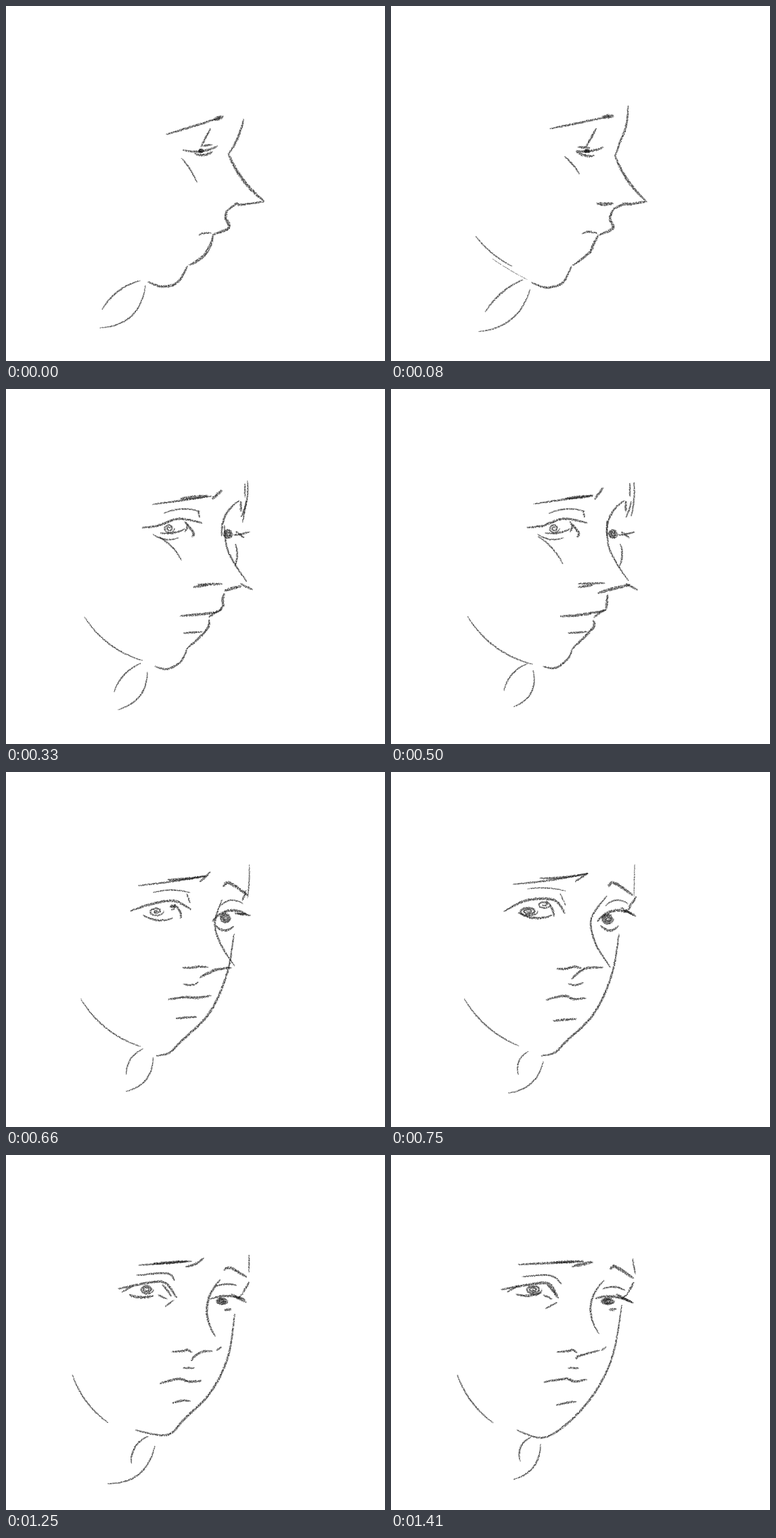
An HTML page with a canvas that plays this animation: 560 px wide and 525 px high, repeating every 1660 ms.

```html
<!DOCTYPE html>
<html lang="en">
<head>
<meta charset="utf-8">
<title>Turning head</title>
<style>
  html, body { margin: 0; width: 100%; height: 100%; overflow: hidden; background: #fff; }
  canvas { display: block; width: 560px; height: 525px; }
</style>
</head>
<body>
<canvas id="stage" width="560" height="525"></canvas>
<script>
const W = 560, H = 525, TAU = Math.PI * 2;
const lerp = (a, b, t) => a + (b - a) * t;

// A stroke is a weight in pixels and a path: u in 0..1 gives [x, y].

// Bowed line; bow is how far its middle leans to the right of travel
function arc(weight, x0, y0, x1, y1, bow = 0) {
  const len = Math.hypot(x1 - x0, y1 - y0);
  const path = u => {
    const k = 4 * u * (1 - u) * bow / len;
    return [lerp(x0, x1, u) - (y1 - y0) * k, lerp(y0, y1, u) + (x1 - x0) * k];
  };
  return { weight, path };
}

// Catmull-Rom line through a few points
function curve(weight, ...xy) {
  const n = xy.length / 2 - 1;
  const at = (i, k) => xy[2 * Math.max(0, Math.min(n, i)) + k];
  const path = u => {
    const i = Math.min(n - 1, Math.floor(u * n)), t = u * n - i;
    return [0, 1].map(k => {
      const [a, b, c, d] = [-1, 0, 1, 2].map(j => at(i + j, k));
      return b + t / 2 * (c - a + t * (2 * a - 5 * b + 4 * c - d + t * (3 * (b - c) + d - a)));
    });
  };
  return { weight, path };
}

// Spiral scribble that fills an ellipse
function iris(weight, x, y, rx, ry, turns = 3) {
  const path = u => {
    const a = u * turns * TAU, r = 1 - 0.85 * u;
    return [x + Math.cos(a) * rx * r, y + Math.sin(a) * ry * r];
  };
  return { weight, path };
}

const profile = {
  brow: arc(3.5, 237, 190, 318, 165),
  browEnd: arc(7, 308, 168, 320, 164),
  ridge: arc(3.5, 351, 167, 329, 219, -3),
  bridge: arc(4.8, 329, 219, 381, 288, 6),
  noseBase: curve(3.8, 382, 289, 346, 294, 341, 292, 326, 303),
  lip: curve(4.8, 326, 303, 325, 314, 329, 328, 306, 338),
  mouth: arc(3, 285, 339, 303, 336, -2),
  lowLip: arc(4.8, 306, 339, 271, 383, -8),
  chin: curve(4, 268, 385, 253, 409, 230, 415, 210, 408),
  neck: arc(2.5, 198, 406, 142, 449, 7),
  throat: arc(2.3, 206, 413, 139, 476, -19),
  lash: arc(3, 302, 181, 288, 208),
  lid: arc(3.5, 261, 213, 313, 207, 5),
  lidLow: arc(4, 279, 218, 305, 215, 4),
  lidTop: arc(3.5, 290, 207, 304, 205),
  pupil: iris(2.5, 288, 214, 4, 3),
  cheek: arc(2.3, 259, 225, 282, 261, -2)
};

const lowered = {
  brow: arc(3.2, 233, 173, 322, 163),
  browEnd: arc(7, 317, 161, 337, 160),
  ridge: curve(3, 350, 128, 349, 168, 336, 205, 333, 224),
  bridge: arc(3.5, 333, 224, 371, 287, 4),
  noseBase: arc(5, 374, 289, 331, 297),
  nostril: arc(5.5, 304, 292, 328, 292, 1),
  lip: curve(4, 331, 297, 322, 315, 327, 329, 309, 339),
  mouth: arc(3.5, 280, 334, 306, 337, -3),
  lowLip: curve(3.5, 306, 338, 298, 347, 299, 356, 266, 384),
  chin: curve(3.3, 266, 384, 254, 410, 241, 415, 228, 418, 205, 410),
  jaw: arc(2, 125, 340, 179, 385, 4),
  jawFaint: arc(0.7, 150, 374, 202, 405, 1),
  neck: arc(2.8, 191, 404, 137, 455, 4),
  throat: arc(2.3, 205, 425, 120, 487, -14),
  lash: arc(4, 304, 181, 288, 208, -1),
  lid: arc(4, 288, 215, 314, 211, 1),
  lidLow: arc(4, 268, 212, 295, 228, 2),
  lidTop: arc(4, 263, 210, 284, 215),
  pupil: iris(2.5, 291, 215, 6, 2),
  cheek: arc(3, 254, 220, 275, 236, -1)
};

const opening = {
  brow: arc(3, 211, 170, 298, 157),
  browDark: arc(5, 258, 162, 298, 158),
  browEnd: arc(4, 301, 163, 313, 146),
  ridge: arc(2.3, 359, 138, 355, 188, -2),
  ridgeIn: arc(2.3, 353, 139, 353, 160),
  ridgeLow: arc(2.5, 355, 166, 347, 190, -1),
  socket: arc(3.2, 319, 218, 345, 165, -9),
  socketEdge: arc(3.5, 347, 166, 347, 181),
  bridge: curve(2.6, 319, 195, 321, 230, 333, 257, 351, 284),
  farIris: iris(3, 328, 214, 7, 7),
  farLash: arc(3, 336, 216, 360, 211, 1),
  farLashLow: arc(3, 340, 211, 352, 220),
  farCheek: arc(2.8, 339, 229, 338, 262, -3),
  nostril: arc(3.3, 277, 288, 316, 287),
  nostrilLow: arc(3.8, 277, 293, 298, 290),
  noseBase: arc(5, 306, 302, 353, 290, -1),
  noseTip: arc(3.3, 347, 288, 364, 297),
  lip: arc(4.3, 320, 304, 318, 325),
  lipEdge: arc(3.5, 318, 326, 300, 338, 1),
  mouth: arc(4.3, 250, 336, 317, 327, 2),
  lowLip: curve(4, 299, 342, 298, 354, 268, 384),
  underLip: arc(3.2, 262, 361, 290, 359),
  chin: curve(3.3, 268, 384, 262, 398, 248, 410, 237, 413, 225, 410),
  jaw: arc(2.2, 113, 336, 209, 407, 12),
  neck: arc(2.3, 202, 406, 167, 446, 7),
  throat: arc(2.3, 210, 416, 181, 470, -13),
  crease: arc(2.3, 233, 184, 286, 181, -5),
  creaseEnd: arc(2.5, 284, 180, 286, 190),
  eyeLid: curve(3.8, 201, 205, 225, 202, 255, 192, 290, 198),
  iris: iris(2.6, 241, 206, 8, 7, 2),
  eyeEdge: arc(3.3, 264, 196, 264, 211, -4),
  eyeMid: arc(3, 228, 213, 264, 207, 3),
  eyeLow: arc(2.3, 217, 215, 255, 220, 5),
  eyeInner: curve(4, 268, 200, 277, 213, 275, 219),
  cheek: arc(2.3, 217, 218, 254, 259, -4)
};

const facing = {
  brow: arc(2.8, 180, 166, 291, 150, 2),
  browDark: arc(3.5, 220, 157, 291, 150, 2),
  browEnd: arc(3, 272, 162, 291, 150),
  ridge: arc(1.3, 360, 136, 359, 184),
  farBrow: curve(4.8, 321, 169, 330, 164, 357, 182),
  socketEdge: arc(3.3, 362, 184, 351, 199, -1),
  farCrease: arc(2.3, 317, 198, 350, 195, -7),
  bridge: curve(3, 319, 183, 296, 217, 302, 253, 324, 289),
  farLid: arc(4.3, 305, 221, 357, 211, -11),
  farLash: arc(3.8, 340, 201, 362, 213),
  farLashLow: arc(3, 344, 208, 355, 199),
  farIris: iris(3.4, 320, 217, 9, 8),
  farLow: arc(3.8, 310, 227, 336, 228, 7),
  contour: curve(3.5, 337, 240, 326, 300, 300, 357, 257, 400, 242, 415, 222, 420),
  nostril: curve(4, 245, 291, 258, 291, 270, 288, 281, 290),
  noseBase: curve(4, 267, 306, 277, 297, 290, 290, 313, 289),
  noseLow: arc(3, 262, 313, 284, 311, 3),
  mouth: curve(4, 229, 337, 256, 331, 270, 336, 288, 334),
  underLip: arc(3.8, 239, 368, 274, 365),
  jaw: arc(2.2, 108, 335, 189, 405, 9),
  neck: arc(2.2, 203, 413, 188, 448, 7),
  throat: arc(2.2, 225, 428, 173, 475, -12),
  crease: arc(1.8, 202, 173, 258, 176, -3),
  creaseEnd: arc(1.8, 250, 180, 258, 197),
  eyeLid: curve(4, 167, 206, 200, 190, 240, 189, 257, 209),
  iris: iris(3.2, 203, 206, 14, 7, 2.5),
  eyeEdge: iris(2.8, 226, 196, 10, 6, 1.5),
  eyeInner: arc(3.3, 229, 191, 241, 214, -3),
  eyeLow: arc(3.8, 188, 208, 238, 212, 6)
};

const settled = {
  ...facing,
  brow: arc(2.7, 180, 166, 270, 154, -1),
  browDark: arc(3.5, 220, 157, 284, 153, 1),
  browEnd: arc(3.2, 245, 160, 291, 152, 2),
  ridge: arc(2, 360, 149, 362, 184, 1),
  farBrow: curve(4, 322, 168, 332, 166, 362, 184),
  socketEdge: arc(2.6, 358, 190, 350, 204),
  farCrease: arc(2.3, 307, 197, 350, 196, -6),
  bridge: curve(3.2, 313, 190, 296, 220, 302, 253, 320, 286),
  farLid: arc(4, 302, 220, 358, 211, -10),
  farLash: arc(3.5, 335, 200, 350, 215),
  farIris: iris(3.2, 319, 217, 8, 6),
  farLow: arc(4, 321, 233, 333, 227, 1),
  noseLow: arc(2.8, 260, 316, 285, 316, 3),
  underLip: curve(3.5, 245, 366, 260, 366, 272, 365),
  neck: arc(2.5, 201, 417, 190, 453, 7),
  throat: arc(2.5, 220, 430, 196, 469, -9),
  crease: arc(2.5, 198, 177, 242, 175, -3),
  creaseEnd: arc(2.3, 248, 180, 252, 190),
  iris: iris(2.8, 203, 202, 14, 8, 2),
  cheek: arc(2.5, 226, 229, 256, 213, 1)
};

const resting = {
  brow: arc(3, 196, 163, 275, 157),
  browDark: arc(4.5, 217, 161, 268, 157),
  browEnd: arc(3.8, 265, 165, 292, 152, 3),
  ridge: arc(2.2, 359, 148, 359, 173),
  farBrow: curve(4.2, 322, 170, 332, 167, 356, 181),
  socketEdge: arc(3.3, 359, 188, 350, 204),
  farCrease: arc(2.8, 308, 195, 341, 193, -3),
  bridge: arc(3.6, 317, 184, 309, 268, 16),
  farLid: arc(3.8, 302, 213, 354, 214, -5),
  farLash: arc(3.8, 333, 206, 355, 218),
  farLashLow: arc(2.5, 341, 213, 350, 205),
  farIris: iris(3.5, 319, 216, 9, 5),
  farLow: arc(4.5, 323, 229, 333, 228),
  contour: curve(3.5, 338, 235, 328, 298, 303, 350, 264, 390, 238, 414, 191, 407),
  nostril: curve(3.6, 245, 291, 262, 290, 268, 288, 275, 292),
  noseBase: curve(3.6, 274, 305, 277, 299, 290, 291, 305, 290),
  noseTip: arc(3, 311, 289, 318, 284),
  noseLow: arc(3, 262, 315, 278, 315),
  mouth: curve(4.2, 227, 338, 255, 331, 270, 335, 289, 334),
  underLip: arc(3.6, 246, 367, 272, 364, -2),
  jaw: arc(2.3, 98, 325, 151, 396, 7),
  neck: arc(2.8, 210, 416, 185, 456, 8),
  throat: arc(2.5, 220, 430, 150, 486, -18),
  crease: curve(3, 193, 178, 238, 175, 249, 186),
  eyeLid: curve(4, 166, 198, 210, 189, 235, 189, 252, 211),
  lashes: arc(2.5, 171, 203, 189, 193),
  iris: iris(3, 208, 199, 10, 7, 2.5),
  eyeEdge: arc(3.2, 231, 192, 244, 209, -1),
  eyeLow: arc(4.5, 182, 207, 218, 208, 3),
  eyeInner: arc(3, 225, 207, 238, 213),
  cheek: arc(2.5, 235, 224, 248, 215)
};

const last = {
  ...resting,
  brow: arc(3.5, 188, 162, 270, 158),
  browDark: arc(4.5, 240, 159, 285, 157),
  browEnd: arc(5, 268, 165, 298, 158),
  ridge: arc(2.2, 357, 153, 361, 177),
  farBrow: curve(5, 324, 169, 331, 165, 358, 182),
  farCrease: arc(3, 313, 198, 346, 200, -4),
  bridge: arc(3, 315, 185, 307, 264, 16),
  farLid: arc(4.3, 302, 212, 358, 219, -6),
  farIris: iris(3.6, 320, 216, 10, 5),
  contour: curve(3.2, 341, 222, 328, 295, 302, 350, 264, 394, 225, 418, 186, 407),
  noseBase: curve(3.6, 274, 302, 278, 297, 308, 289),
  mouth: curve(4, 226, 336, 258, 331, 272, 335, 289, 332),
  underLip: arc(3.4, 244, 370, 274, 365, -1),
  neck: arc(2.6, 207, 417, 191, 453, 8),
  throat: arc(2.5, 221, 428, 181, 480, -12),
  crease: curve(2.6, 194, 180, 235, 178, 252, 191),
  eyeLid: curve(4.3, 163, 199, 215, 190, 235, 192, 247, 212),
  iris: iris(3.2, 211, 199, 12, 7, 2.5),
  eyeLow: arc(4, 185, 206, 222, 204, 3),
  cheek: arc(2.6, 229, 227, 245, 218)
};

function blend(from, to, t) {
  const out = {};
  for (const key in to) {
    const a = from[key] || to[key], b = to[key];
    out[key] = {
      weight: lerp(a.weight, b.weight, t),
      path: u => {
        const p = a.path(u), q = b.path(u);
        return [lerp(p[0], q[0], t), lerp(p[1], q[1], t)];
      }
    };
  }
  return out;
}

function randomFrom(seed) {
  return () => (seed = (seed * 16807) % 2147483647) / 2147483647;
}

// Grainy pencil line: specks scattered over a width that tapers at both ends
function pencil(ctx, { weight, path }, rnd) {
  const parts = 80;
  let [x0, y0] = path(0);
  for (let i = 1; i <= parts; i++) {
    const u = i / parts, [x1, y1] = path(u);
    const w = weight * (0.4 + 0.6 * Math.sqrt(Math.sin(Math.PI * (u - 0.5 / parts))));
    const count = Math.floor(Math.hypot(x1 - x0, y1 - y0) * w * 1.7 + rnd());
    for (let k = 0; k < count; k++) {
      const t = rnd(), a = rnd() * TAU, r = Math.sqrt(rnd()) * w / 2;
      ctx.fillRect(lerp(x0, x1, t) + Math.cos(a) * r - 0.5, lerp(y0, y1, t) + Math.sin(a) * r - 0.5, 1, 1);
    }
    [x0, y0] = [x1, y1];
  }
}

function render(face, seed) {
  const sheet = document.createElement('canvas');
  sheet.width = W;
  sheet.height = H;
  const ctx = sheet.getContext('2d');
  ctx.fillStyle = '#fff';
  ctx.fillRect(0, 0, W, H);
  ctx.fillStyle = 'rgba(28, 28, 28, 0.42)';
  const rnd = randomFrom(seed * 977 + 31);
  Object.values(face).forEach(stroke => pencil(ctx, stroke, rnd));
  return sheet;
}

const steps = [
  [80, profile], [160, blend(profile, lowered, 0.5)],
  [330, lowered], [500, blend(lowered, opening, 0.75)],
  [660, opening], [750, blend(opening, facing, 0.5)],
  [1000, facing], [1250, settled], [1410, resting], [1660, last]
].map(([end, face], i) => ({ end, sheet: render(face, i + 1) }));

const stage = document.getElementById('stage').getContext('2d');
const LOOP = 1660, start = performance.now();
let shown;

function tick(now) {
  const t = Math.max(0, now - start) % LOOP;
  const step = steps.find(s => t < s.end);
  if (step !== shown) stage.drawImage((shown = step).sheet, 0, 0);
  requestAnimationFrame(tick);
}
tick(start);
</script>
</body>
</html>
```
